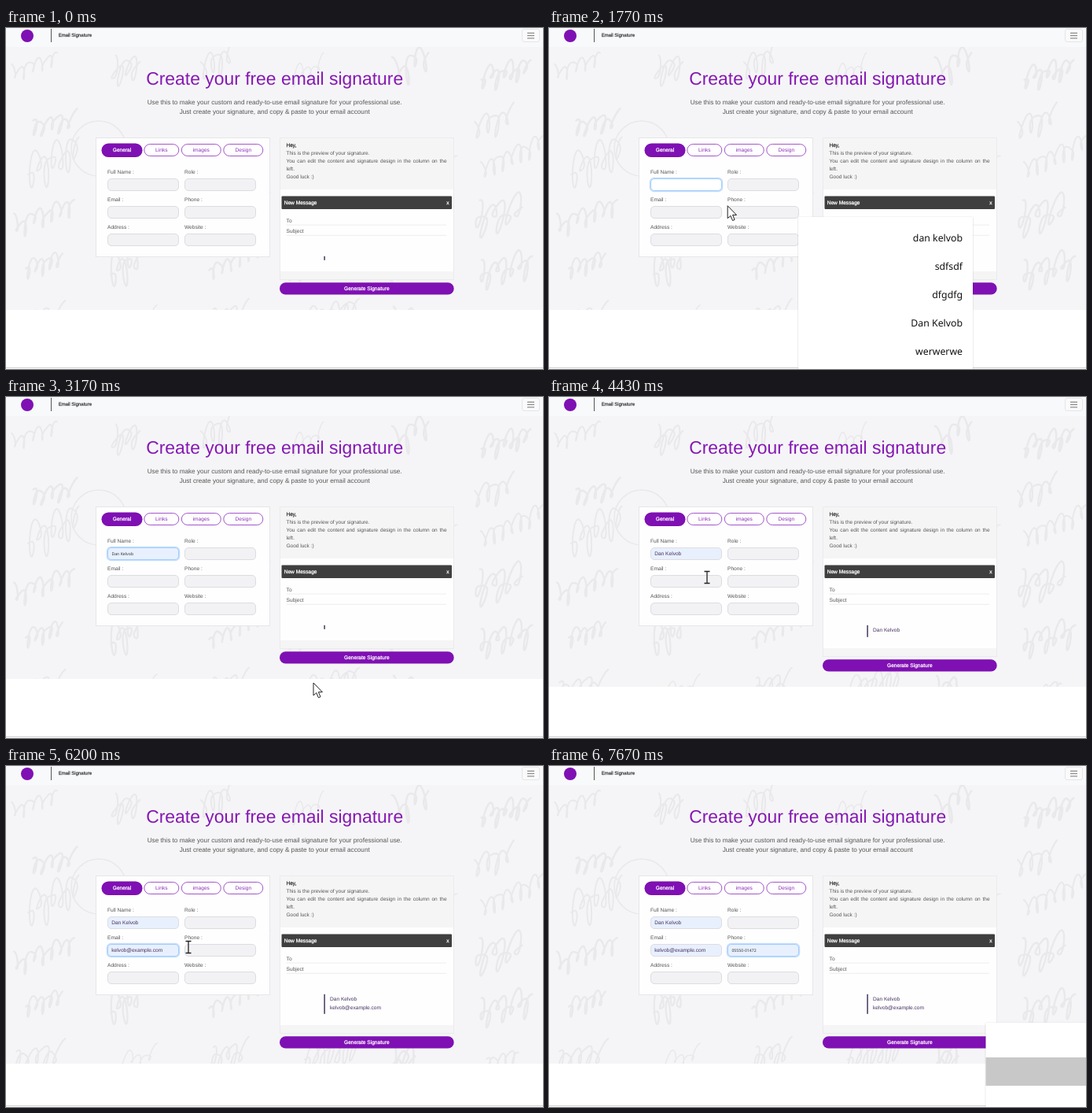
Recreate the animation shown at these times as an HTML page. Size 683 by 433 pixels, loop 8000 ms.

```html
<!DOCTYPE html>
<html lang="en">
<head>
<meta charset="utf-8">
<title>Email signature form</title>
<style>
  html, body { margin: 0; width: 100%; height: 100%; overflow: hidden; background: #fff; }
  svg { display: block; width: 100%; height: 100%; }
  text { font-family: "Liberation Sans", Arial, sans-serif; font-size: 6.6px; fill: #555; text-rendering: geometricPrecision; white-space: pre; }
  .menu, .hint { font-family: "Noto Sans", "Open Sans", sans-serif; }
  .menu { font-size: 12.3px; fill: #111; text-anchor: end; }
  .hint { font-size: 5.2px; fill: #333; }
  .value { fill: #45305f; }
  .mid { text-anchor: middle; }
  .title { font-size: 22.9px; fill: #8518b3; }
  .lead { font-size: 8.2px; }
  .note { font-size: 6.5px; }
  .strong { stroke: currentColor; stroke-width: .26px; fill: currentColor; }
</style>
</head>
<body>
<svg id="stage" viewBox="0 0 683 433"></svg>
<script>
const LOOP = 8000;
const STEP = 77;
const PURPLE = '#7f10b3';
const NAME = 'Dan Kelvob';
const MAIL = 'kelvob@example.com';
const stage = document.getElementById('stage');

function add(parent, tag, attrs, content) {
  const el = document.createElementNS('http://www.w3.org/2000/svg', tag);
  set(el, attrs);
  if (content !== undefined) el.textContent = content;
  parent.appendChild(el);
  return el;
}
function set(el, attrs) {
  for (const key in attrs) el.setAttribute(key, attrs[key]);
}
const show = (el, on) => { el.style.display = on ? '' : 'none'; };
const rect = (p, x, y, width, height, fill, more) => add(p, 'rect', { x, y, width, height, fill, ...more });
const line = (p, x1, y1, x2, y2, stroke, w = 1) => add(p, 'line', { x1, y1, x2, y2, stroke, 'stroke-width': w });
const label = (p, x, y, content, cls = '') => add(p, 'text', { x, y, class: cls }, content);
const strong = (p, x, y, content, color, cls = '') =>
  set(label(p, x, y, content, 'strong ' + cls), { color });

let seed = 11;
function rand(min, max) {
  seed = (seed * 16807) % 2147483647;
  return min + (max - min) * seed / 2147483647;
}

// Loose looping pen stroke used as the wallpaper
function scrawl(p, x, y) {
  const loops = Math.floor(rand(4, 8));
  const height = rand(22, 42);
  const advance = rand(8, 13);
  const phase = rand(0, 6);
  const n = loops * 16;
  let d = '';
  for (let i = 0; i <= n; i++) {
    const a = i / n * loops * 2 * Math.PI;
    const tall = 0.5 + 0.5 * Math.sin(a * 0.63 + phase);
    const py = -height / 2 * (Math.cos(a) * (0.25 + 0.75 * tall) + 0.3 * Math.sin(a * 0.41 + phase));
    const px = advance * i / 16 + height * 0.13 * Math.sin(a) - py * 0.45;
    d += (i ? 'L' : 'M') + px.toFixed(1) + ' ' + py.toFixed(1);
  }
  add(p, 'path', { d, 'stroke-width': rand(1.4, 2.6), transform: `translate(${x} ${y}) rotate(${rand(-30, -6)})` });
}

// Wallpaper: a jittered grid, kept clear of the heading
const clip = add(add(stage, 'defs', {}), 'clipPath', { id: 'heroClip' });
const heroClip = rect(clip, 0, 24, 683, 334, '#fff');
const hero = add(stage, 'g', { 'clip-path': 'url(#heroClip)' });
rect(hero, 0, 24, 683, 409, '#f5f5f7');
const ink = add(hero, 'g', { fill: 'none', stroke: '#e9e9eb', 'stroke-linecap': 'round', 'stroke-linejoin': 'round' });
for (let row = 0; row < 6; row++) {
  for (let col = 0; col < 6; col++) {
    const heading = row === 1 && col > 0 && col < 5;
    if (!heading) scrawl(ink, 14 + 116 * col + rand(-8, 18), 60 + 63 * row + rand(-8, 8));
  }
}
add(ink, 'circle', { cx: 118, cy: 153, r: 35, 'stroke-width': 1.6 });

// Header
rect(stage, 0, 0, 683, 24, '#f8f9fb');
add(stage, 'circle', { cx: 27, cy: 10, r: 8, fill: PURPLE });
line(stage, 57.5, 1, 57.5, 18, '#555');
add(stage, 'text', { x: 66.7, y: 11, class: 'strong', color: '#444', style: 'font-size:6px' }, 'Email Signature');
rect(stage, 656.5, 1.5, 22, 16, '#fafafb', { stroke: '#e6e6e9', rx: 2.5 });
for (let i = 0; i < 3; i++) line(stage, 663, 6.4 + 3.3 * i, 672, 6.4 + 3.3 * i, '#666', 0.9);

// Heading
label(stage, 341.7, 72, 'Create your free email signature', 'mid title');
label(stage, 341.7, 97, 'Use this to make your custom and ready-to-use email signature for your professional use.', 'mid lead');
label(stage, 341.7, 109, 'Just create your signature, and copy & paste to your email account', 'mid lead');

// Form card
rect(stage, 114.5, 139.5, 221, 151, '#fefefe', { stroke: '#e6e6e9' });
rect(stage, 121.5, 146.5, 52, 17.5, PURPLE, { rx: 8.7 });
strong(stage, 147.5, 157.2, 'General', '#fff', 'mid');
let tabX = 175.8;
for (const name of ['Links', 'images', 'Design']) {
  const w = 14 + 6 * name.length;
  rect(stage, tabX, 147.5, w, 15, '#fefefe', { rx: 7.5, stroke: '#9a45c4', 'stroke-width': 0.9 });
  set(label(stage, tabX + w / 2, 157.2, name, 'mid'), { style: 'fill:#8d30bb' });
  tabX += w + 3.5;
}

const fields = ['Full Name', 'Role', 'Email', 'Phone', 'Address', 'Website'].map((name, i) => {
  const x = 129 + 98 * (i % 2);
  const y = 191 + 35 * Math.floor(i / 2);
  label(stage, x, y - 6, name + ' :');
  return {
    x, y,
    glow: rect(stage, x - 0.5, y - 0.5, 92, 17, 'none', { rx: 5.2, stroke: '#c3defc', 'stroke-width': 1.6 }),
    box: rect(stage, x + 0.5, y + 0.5, 90, 15, '#f2f1f4', { rx: 4.5 }),
    hint: label(stage, x + 5.4, y + 9.8, '', 'hint'),
    value: label(stage, x + 5.2, y + 10.2, '', 'value'),
    caret: line(stage, x + 5.5, y + 4, x + 5.5, y + 12, '#333', 0.8)
  };
});

// Preview panel
const panel = rect(stage, 348.5, 139.5, 221, 180, '#f5f5f5', { stroke: '#ebebed' });
const sheet = rect(stage, 349, 205, 220, 104, '#fefefe');
strong(stage, 356.5, 151, 'Hey,', '#333', 'note');
[
  'This is the preview of your signature.',
  'You can edit the content and signature design in the column on the',
  'left.',
  'Good luck :)'
].forEach((s, i) => set(label(stage, 356.5, 161 + 10 * i, s, 'note'), { 'word-spacing': i === 1 ? 1 : 0 }));
rect(stage, 350.5, 213.5, 216.5, 16.5, '#3f3f3f', { rx: 1 });
strong(stage, 353.7, 224.2, 'New Message', '#fff');
strong(stage, 560.2, 224.2, 'x', '#fff');
['To', 'Subject'].forEach((s, i) => {
  const y = 247 + 13.2 * i;
  label(stage, 356.6, y, s);
  line(stage, 356.5, y + 3.1, 560, y + 3.1, '#ececef', 0.9);
});
const bar = rect(stage, 404.4, 289.8, 1.4, 5, '#3b2950');
const signLines = [NAME, MAIL].map((s, i) => label(stage, 412, 298 + 11 * i, s, 'value'));
const button = add(stage, 'g', {});
rect(button, 348, 323.3, 221.7, 15.2, PURPLE, { rx: 7.6 });
strong(button, 458.8, 333.2, 'Generate Signature', '#fff', 'mid');

line(stage, 0, 431.5, 683, 431.5, '#cfcfcf', 1.2);

// Each visit presses a field, opens its suggestions and picks one
const ROW = 36;
function makeVisit(field, press, pick, x, y, rows) {
  const g = add(stage, 'g', {});
  rect(g, x - 1, y - 0.5, 224, 220, '#000', { opacity: 0.07, rx: 2 });
  rect(g, x, y, 222, 220, '#fff');
  const mark = rect(g, x, 0, 222, ROW, '#c8c8c8');
  rows.forEach((s, i) => label(g, x + 209, y + 31 + ROW * i, s, 'menu'));
  return {
    field: fields[field], press, pick, x, y, rows, g, mark,
    focus: press + 140, open: press + 150, close: pick + 70, commit: pick + 170, grow: pick + 320, blur: pick + 870
  };
}
const visits = [
  makeVisit(0, 1160, 3100, 317, 240, [NAME.toLowerCase(), 'sdfsdf', 'dfgdfg', NAME, 'werwerwe']),
  makeVisit(2, 4360, 5580, 317, 326, [MAIL, 'sdfsdf', 'dfgdfg']),
  makeVisit(3, 6350, LOOP, 555.5, 326, ['05550-11', '05550-01472'])
];

// Pointer
const halo = add(stage, 'circle', { r: 12, fill: '#f7ea1c', opacity: 0.8 });
const arrow = add(stage, 'path', { d: 'M0 0V16L3.8 12.6L6.4 18.8L9 17.7L6.4 11.7H11.4Z', fill: '#fff', stroke: '#222', 'stroke-linejoin': 'round' });
const beam = add(stage, 'path', { d: 'M-3.5 -7.5H3.5M0 -7.5V7.5M-3.5 7.5H3.5', fill: 'none', stroke: '#222', 'stroke-width': 1.3 });

const trips = [
  { from: 290, to: 990, x: 155, y: 206 },
  { from: 1540, to: 2230, x: 360, y: 262 },
  { from: 2700, to: 2930, x: 391, y: 363 },
  { from: 3270, to: 4040, x: 201, y: 229 },
  { from: 4890, to: 5430, x: 380, y: 345 },
  { from: 5740, to: 6200, x: 232, y: 230 },
  { from: 6740, to: 7200, x: 700, y: 390 }
];

function pointer(t) {
  let x = 490, y = 440;
  for (const trip of trips) {
    if (t < trip.from) break;
    const steps = Math.round((trip.to - trip.from) / STEP) + 1;
    const p = t >= trip.to ? 1 : Math.min(1, (Math.floor((t - trip.from) / STEP) + 1) / steps);
    const e = p * p * (3 - 2 * p);
    x += (trip.x - x) * e;
    y += (trip.y - y) * e;
  }
  return [x, y];
}

function draw(t) {
  const [cx, cy] = pointer(t);
  const lines = visits.filter(v => t >= v.grow).length;
  const grow = 10 * lines;

  set(heroClip, { height: 334 + grow });
  set(panel, { height: 180 + grow });
  set(sheet, { height: 104 + grow });
  set(button, { transform: `translate(0 ${grow})` });
  set(bar, { height: 5 + grow });
  signLines.forEach((el, i) => show(el, i < lines));

  for (const f of fields) Object.assign(f, { active: false, blink: false, draft: '', done: '' });
  let covered = false;
  for (const v of visits) {
    const open = t >= v.open && t < v.close;
    const row = Math.floor((cy - v.y - 8) / ROW);
    const over = cx >= v.x && cx < v.x + 222 && row >= 0 && row < v.rows.length;
    show(v.g, open);
    show(v.mark, over);
    set(v.mark, { y: v.y + 8 + ROW * row });
    covered = covered || (open && cx >= v.x && cy >= v.y);

    const f = v.field;
    f.active = t >= v.focus && t < v.blur;
    f.blink = f.active && t < v.commit && (t - v.focus) % 1000 < 500 === t > v.close - 400;
    if (t >= v.commit) f.done = v === visits[0] ? NAME : MAIL;
    else if (t >= v.open && over) f.draft = v.rows[row];
  }

  for (const f of fields) {
    f.hint.textContent = f.draft;
    f.value.textContent = f.done;
    show(f.glow, f.active);
    show(f.caret, f.blink && !(f.draft && t > 7000));
    set(f.box, {
      fill: f.done || f.draft ? '#e8f0fe' : f.active ? '#fff' : '#f2f1f4',
      stroke: f.active ? '#a3cdfb' : '#dddce1'
    });
  }

  const typing = !covered && fields.some(f => cx >= f.x && cx <= f.x + 91 && cy >= f.y && cy <= f.y + 16);
  show(beam, typing);
  show(arrow, !typing);
  set(typing ? beam : arrow, { transform: `translate(${cx} ${cy})` });
  show(halo, visits.some(v => [v.press, v.pick].some(c => t >= c && t < c + 70)));
  set(halo, { cx: cx - 2, cy: cy - 0.5 });
}

const begin = performance.now();
function tick() {
  draw((performance.now() - begin) % LOOP);
  requestAnimationFrame(tick);
}
draw(0);
requestAnimationFrame(tick);
</script>
</body>
</html>
```
